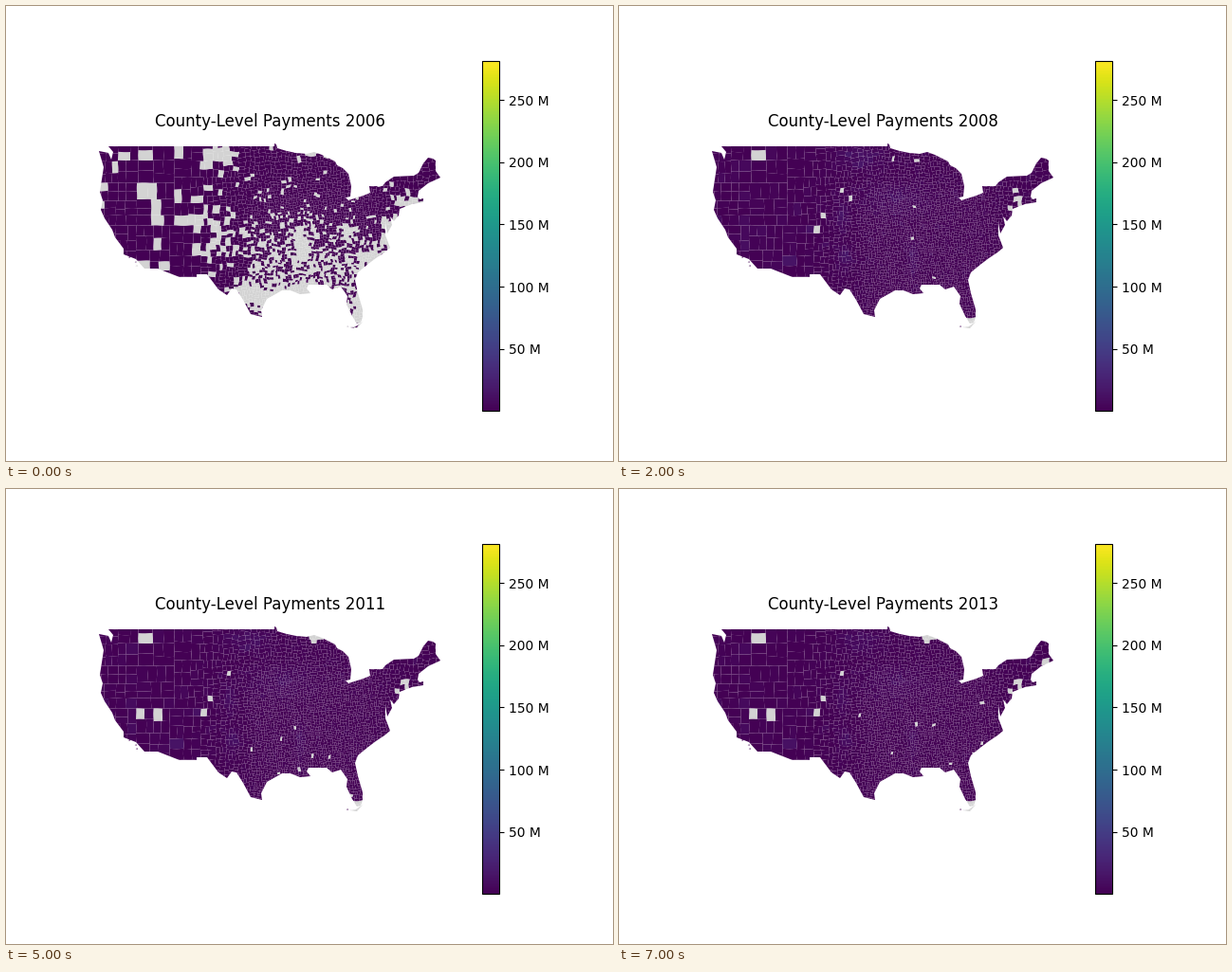
A matplotlib script for the animation above (8000 ms loop, 640 by 480 pixels).

```python
import matplotlib.pyplot as plt
import numpy as np
from matplotlib.animation import FuncAnimation
from matplotlib.cm import ScalarMappable
from matplotlib.collections import PolyCollection
from matplotlib.colors import Normalize, to_rgba
from matplotlib.path import Path

FIRST_YEAR, YEARS = 2006, 8
rng = np.random.default_rng(11)

# Key points of the border in stage pixels, clockwise from the north-west.
NORTH_EAST = [
    (108, 148), (283, 148), (283, 145), (285, 146), (286, 150), (296, 153),
    (306, 155), (317, 156), (325, 154), (333, 157), (347, 164), (349, 168),
    (355, 171), (361, 177), (364, 190), (363, 201), (358, 202), (361, 205),
    (377, 200), (384, 197), (383, 190), (397, 190), (400, 186), (409, 180),
    (430, 179), (435, 176), (440, 166), (445, 160), (450, 161), (453, 163),
    (453, 174), (458, 181), (445, 187), (435, 195), (434, 201), (436, 204),
    (440, 203), (440, 207), (428, 209), (415, 214), (414, 221), (409, 227),
    (405, 222), (407, 231), (402, 240), (400, 228), (400, 242), (405, 255),
    (399, 260), (390, 266), (382, 272), (371, 281), (368, 289), (371, 303),
    (376, 320), (376, 328), (374, 334), (370, 335), (365, 327), (359, 314),
    (360, 306), (353, 296), (344, 299), (338, 294),
]
SOUTH_WEST = [
    (319, 294), (317, 298), (321, 303), (310, 304), (300, 300), (291, 300),
    (275, 309), (269, 321), (270, 328), (258, 325), (250, 310), (243, 299),
    (238, 298), (233, 305), (224, 299), (212, 283), (201, 283), (201, 286),
    (183, 286), (160, 277), (146, 277), (137, 267), (124, 262), (124, 256),
    (115, 244), (112, 236), (104, 224), (100, 215), (102, 205), (99, 196),
    (103, 170), (98, 153), (108, 155), (111, 162), (113, 154),
]
KEYS = [(363, 339), (369, 338), (376, 333), (370, 340)]
ISLETS = [(130, 265), (137, 270), (138, 274), (360, 338)]

# Soft patches that change the chance of missing data: (x, y, rx, ry, amount).
SOUTH_GAPS = [
    (310, 250, 8, 28, 0.7), (362, 236, 11, 7, 0.7), (405, 240, 7, 20, 0.9),
    (384, 266, 14, 8, 0.8), (426, 206, 18, 4, 1), (374, 318, 5, 22, 0.9),
    (325, 155, 10, 4, 1), (255, 305, 25, 14, 0.8), (308, 300, 14, 8, 0.8),
]
WEST_GAPS = [
    (213, 157, 13, 9, 0.9), (131, 157, 9, 8, 0.9), (204, 225, 9, 22, 0.8),
    (155, 212, 9, 8, 0.9), (225, 250, 22, 30, 0.35),
]
WEST_KEPT = [
    (105, 185, 14, 40, -1), (178, 155, 18, 9, -0.8), (146, 265, 15, 11, -1),
    (174, 215, 9, 25, -0.9), (178, 278, 10, 7, -1), (212, 268, 8, 10, -0.6),
    (122, 242, 10, 12, -0.6), (145, 175, 20, 14, -0.4),
]

# Lasting holes: (x, y, radius, first year).
HOLES = [
    (154, 160, 3, 2008), (237, 192, 2, 2008), (215, 222, 3, 2008),
    (207, 236, 2, 2008), (422, 206, 5, 2008), (414, 212, 2, 2008),
    (371, 336, 8, 2008), (159, 236, 4, 2009), (325, 157, 6, 2009),
    (139, 232, 3, 2010),
]

# Areas with larger payments: (x, y, rx, ry, millions).
HOTSPOTS = [
    (133, 247, 6, 6, 40), (178, 270, 7, 6, 24), (238, 265, 5, 10, 28),
    (138, 164, 6, 6, 34), (255, 160, 18, 10, 20), (290, 203, 30, 15, 11),
    (310, 265, 5, 14, 16), (236, 220, 6, 14, 18),
]


def step(edge, softness, v):
    """Smooth rise from 0 to 1 around an edge."""
    return 1 / (1 + np.exp((edge - v) / softness))


def patches(spots):
    """Sum of soft elliptical patches at every county."""
    x, y = centres.T
    return sum(a * np.exp(-((x - cx) / rx) ** 2 - ((y - cy) / ry) ** 2)
               for cx, cy, rx, ry, a in spots)


def county_size(x, y):
    west = 7 * step(-205, 8, -x) + 1.7 * step(-255, 6, -x)
    far_west = -3 * step(-125, 5, -x)
    north = 1.6 * step(-185, 8, -y) + 2.5 * step(405, 8, x)
    return 2.9 + west + far_west + north


def split_blocks():
    """Halve the map box until every block is about one county wide."""
    blocks, stack = [], [(95.0, 143.0, 366.0, 199.0)]
    while stack:
        x, y, w, h = stack.pop()
        if w * h < 1.4 * county_size(x + w / 2, y + h / 2) ** 2:
            blocks.append((x, y, w, h))
            continue
        cut = rng.uniform(0.38, 0.62)
        if w > h:
            stack += [(x, y, w * cut, h), (x + w * cut, y, w * (1 - cut), h)]
        else:
            stack += [(x, y, w, h * cut), (x, y + h * cut, w, h * (1 - cut))]
    return blocks


def cell(x, y, w, h):
    """Block outline, bent a little so that borders wander in the east."""
    t = np.linspace(0, 1, 4, endpoint=False)
    u = np.concatenate([t, t * 0 + 1, 1 - t, t * 0]) * w + x
    v = np.concatenate([t * 0, t, t * 0 + 1, 1 - t]) * h + y
    bend = 0.2 + 0.6 * step(220, 15, u)
    return np.column_stack([u + bend * np.sin(v / 2.7 + u / 9),
                            v + bend * np.sin(u / 3.1 - v / 11)])


def make_outline():
    islet = np.array([(-1.3, 0.2), (0.4, -0.7), (1.2, 0.6)])
    shapes = [np.array(NORTH_EAST + SOUTH_WEST), np.array(KEYS)]
    shapes += [islet + place for place in ISLETS]
    return Path.make_compound_path(
        *[Path(np.vstack([s, s[:1]]), closed=True) for s in shapes])


def missing_in(year):
    x, y = centres.T
    if year < 2008:
        chance = 0.04 + 0.42 * step(238, 10, y) * step(250, 6, x)
        chance += patches(SOUTH_GAPS)
        if year == 2006:
            chance += 0.13 * step(-240, 5, -x) * step(-262, 5, -y)
            return luck < chance + patches(WEST_GAPS)
        return luck < chance + 0.9 * step(-242, 6, -x) + patches(WEST_KEPT)
    gone = (rng.random(len(x)) < 0.003) & (x > 240)
    for hx, hy, r, first in HOLES:
        gap = np.hypot(x - hx, y - hy)
        if year >= first:
            gone |= gap <= max(r, gap.min())
    return gone


def payments_in(year):
    growth = 0.03 if year < 2008 else 1 - 0.05 * (year - 2008)
    return base * growth * rng.uniform(0.75, 1.2, len(base))


cells = [cell(*block) for block in split_blocks()]
centres = np.array([c.mean(axis=0) for c in cells])
luck = rng.uniform(0.01, 0.99, len(cells))
base = rng.exponential(1.6, len(cells))
base += patches(HOTSPOTS) * rng.uniform(0.35, 1, len(cells))

fig, ax = plt.subplots(figsize=(6.4, 4.8), dpi=100)
scale = ScalarMappable(Normalize(0.3, 281.5), "viridis")
fig.colorbar(scale, ax=ax, format=lambda v, _: f"{v:.0f} M")
ax.set_xlim(80, 476.8)
ax.set_ylim(349.2, 135.6)
ax.set_aspect("equal")
ax.axis("off")
title = ax.set_title("")

counties = PolyCollection(cells, edgecolors="none", linewidths=0)
counties.set_snap(False)
ax.add_collection(counties, autolim=False)
counties.set_clip_path(make_outline(), ax.transData)


def paint(year):
    colors = scale.to_rgba(payments_in(year))
    colors[missing_in(year)] = to_rgba("lightgrey")
    return colors


maps = [paint(FIRST_YEAR + i) for i in range(YEARS)]


def update(i):
    counties.set_facecolor(maps[i])
    title.set_text(f"County-Level Payments {FIRST_YEAR + i}")
    return counties, title


anim = FuncAnimation(fig, update, frames=YEARS, interval=1000, repeat=True)
plt.show()
```
